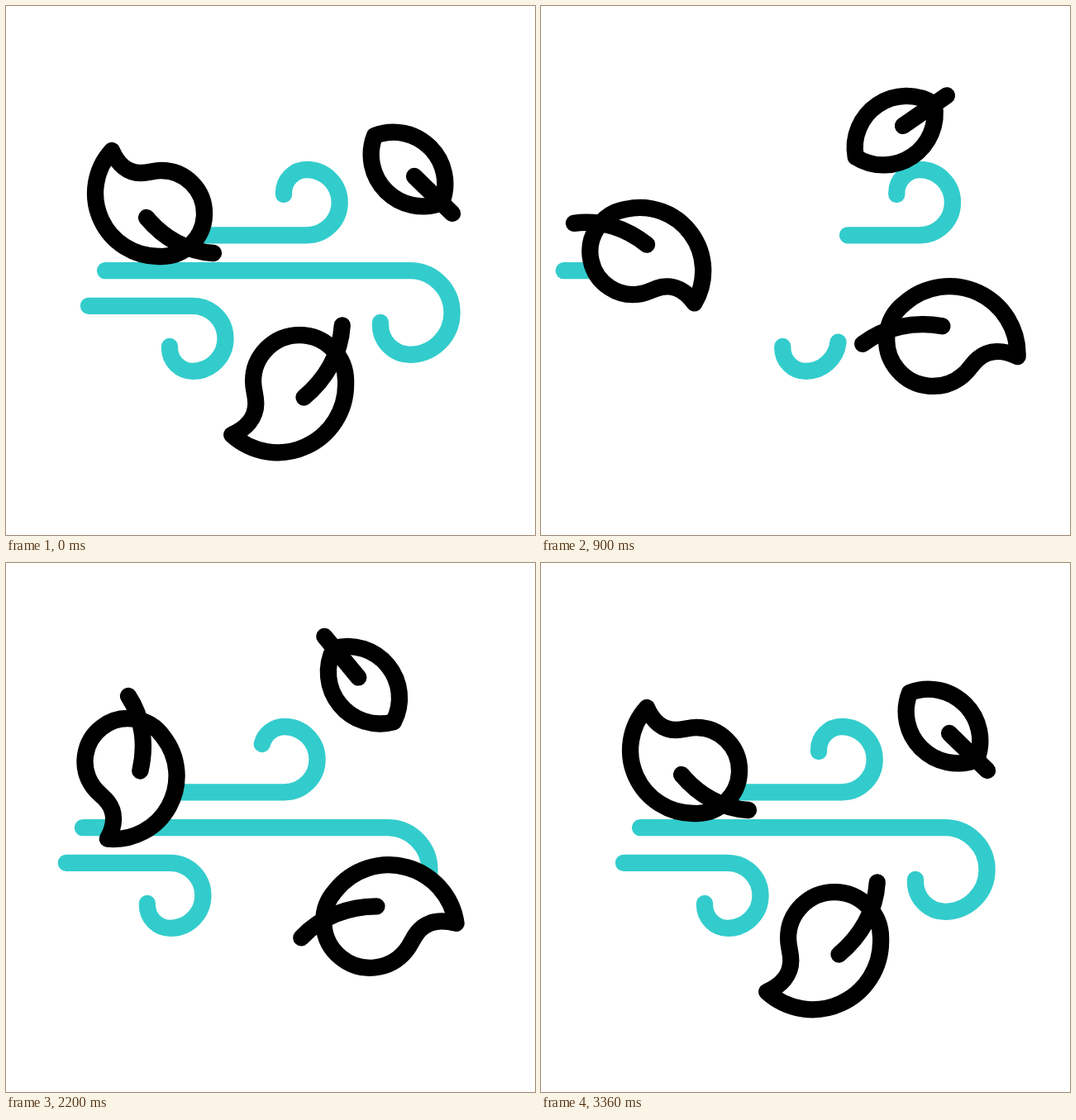
Animation, 640 px wide and 640 px high, one loop 3.6 s. Source, as an HTML page:

```html
<!DOCTYPE html>
<html lang="en">
<head>
<meta charset="utf-8">
<title>Leaves in the wind</title>
<style>
  html, body { margin: 0; width: 100%; height: 100%; overflow: hidden; background: #fff; }
  svg { display: block; width: 100%; height: 100%; }
  path { stroke-linecap: round; stroke-linejoin: round; }
  #wind { fill: none; stroke: #33cccc; stroke-width: 20.3; }
  #leaves { fill: #fff; stroke: #000; stroke-width: 20.3; }
  #low { stroke-width: 18.8; }
  .stem { fill: none; }
</style>
</head>
<body>
<svg viewBox="0 0 640 640">
  <defs>
    <g id="curled" transform="translate(-189.5 -237)">
      <path d="M128 175A76.5 76.5 0 0 0 186 303A52 52 0 0 0 240 251A52 52 0 0 0 188 199C178 199 173 202 163 202C147 202 135 191 128 175Z"/>
      <path class="stem" d="M170 256C190 280 218 297 251 299"/>
    </g>
    <g id="pointed" transform="translate(-492.5 -203.5)">
      <path d="M446 157A62.5 62.5 0 0 1 527 238A62.5 62.5 0 0 1 446 157Z"/>
      <path class="stem" d="M494 206L540 251"/>
    </g>
  </defs>
  <g id="wind"></g>
  <g id="leaves">
    <use id="left" href="#curled"/>
    <use id="right" href="#pointed"/>
    <use id="low" href="#curled"/>
  </g>
</svg>
<script>
const LOOP = 3600, TRIM = 1050, STAGGER = 265;

function newPath(d) {
  const p = document.createElementNS('http://www.w3.org/2000/svg', 'path');
  p.setAttribute('d', d);
  return p;
}

// Ease in and out along the curve (0,0) (x1,0) (x2,1) (1,1)
function ease(t, [start, end], x1 = 1 / 3, x2 = 2 / 3) {
  const u = (t - start) / (end - start);
  if (u <= 0) return 0;
  if (u >= 1) return 1;
  let lo = 0, hi = 1, s;
  for (let i = 0; i < 24; i++) {
    s = (lo + hi) / 2;
    const x = 3 * s * (1 - s) * (x1 * (1 - s) + x2 * s) + s ** 3;
    if (x < u) lo = s; else hi = s;
  }
  return s * s * (3 - 2 * s);
}

// Wind: each gust leaves by its tail, then a new one grows in behind it.
const gusts = [
  'M120 320.2H488.8A50.8 50.8 0 0 1 488.8 421.8A36 36 0 0 1 453 385.8V383',
  'M100 362.8H226A39.5 39.5 0 0 1 226 441.8A28 28 0 0 1 198 413.8V412',
  'M176 277.3H364A39.6 39.6 0 0 0 364 198A28 28 0 0 0 336 226V228'
].map((d, i) => {
  const [old, fresh] = [newPath(d), newPath(d)];
  for (const p of [old, fresh]) p.setAttribute('pathLength', 1);
  document.getElementById('wind').append(old, fresh);
  const span = start => [start + STAGGER * i, start + STAGGER * i + TRIM];
  return { old, fresh, leave: span(4), grow: span(721) };
});

function showPart(path, from, to, dx) {
  const size = to - from;
  path.style.display = size > 1e-4 ? '' : 'none';
  path.setAttribute('stroke-dasharray', size === 1 ? 'none' : `${size} 2`);
  path.setAttribute('stroke-dashoffset', -from);
  path.setAttribute('transform', `translate(${dx})`);
}

function drawWind(t) {
  const ahead = 119 * ease(t, [265, 1165]);
  const behind = -0.0525 * (Math.hypot(Math.max(0, 3035 - t), 415) - 415);
  for (const g of gusts) {
    showPart(g.old, ease(t, g.leave), 1, ahead);
    showPart(g.fresh, 0, ease(t, g.grow), behind);
  }
}

// Leaves drift out along a curve and back, and turn on the way.
const leaves = [
  { id: 'left', scale: 1, route: 'M189.5 237C160 218 104 255 113 313',
    move: { out: [0, 970], back: [1245, 3035] },
    turn: { out: [0, 970], back: [1160, 3200], ease: [0.6, 0.66] },
    home: 45, away: -149.5 },
  { id: 'right', scale: 1, route: 'M492.5 203.5C485 180 435 140 394 124',
    move: { out: [255, 1345], back: [1550, 3370] },
    turn: { out: [342, 1572], back: [1720, 3360], ease: [0.865, 0.64] },
    home: 45, away: -138 },
  { id: 'low', scale: 1.077, route: 'M340 452.5C395 476 455 462 499 395',
    move: { out: [0, 1185], back: [1540, 3130] },
    turn: { out: [0, 1360], back: [1560, 3300], ease: [0.43, 0.84] },
    home: -45, away: -222.6 }
];
for (const leaf of leaves) {
  leaf.node = document.getElementById(leaf.id);
  leaf.path = newPath(leaf.route);
  leaf.length = leaf.path.getTotalLength();
}

const outAndBack = (t, part) => ease(t, part.out) - ease(t, part.back, ...(part.ease || []));

function drawLeaves(t) {
  for (const { node, path, length, scale, move, turn, home, away } of leaves) {
    const { x, y } = path.getPointAtLength(length * outAndBack(t, move));
    const angle = home + (away - home) * outAndBack(t, turn);
    // The leaves are drawn pointing 45 degrees down.
    node.setAttribute('transform', `translate(${x} ${y}) rotate(${angle - 45}) scale(${scale})`);
  }
}

function frame() {
  const t = performance.now() % LOOP;
  drawWind(t);
  drawLeaves(t);
  requestAnimationFrame(frame);
}
frame();
</script>
</body>
</html>
```
